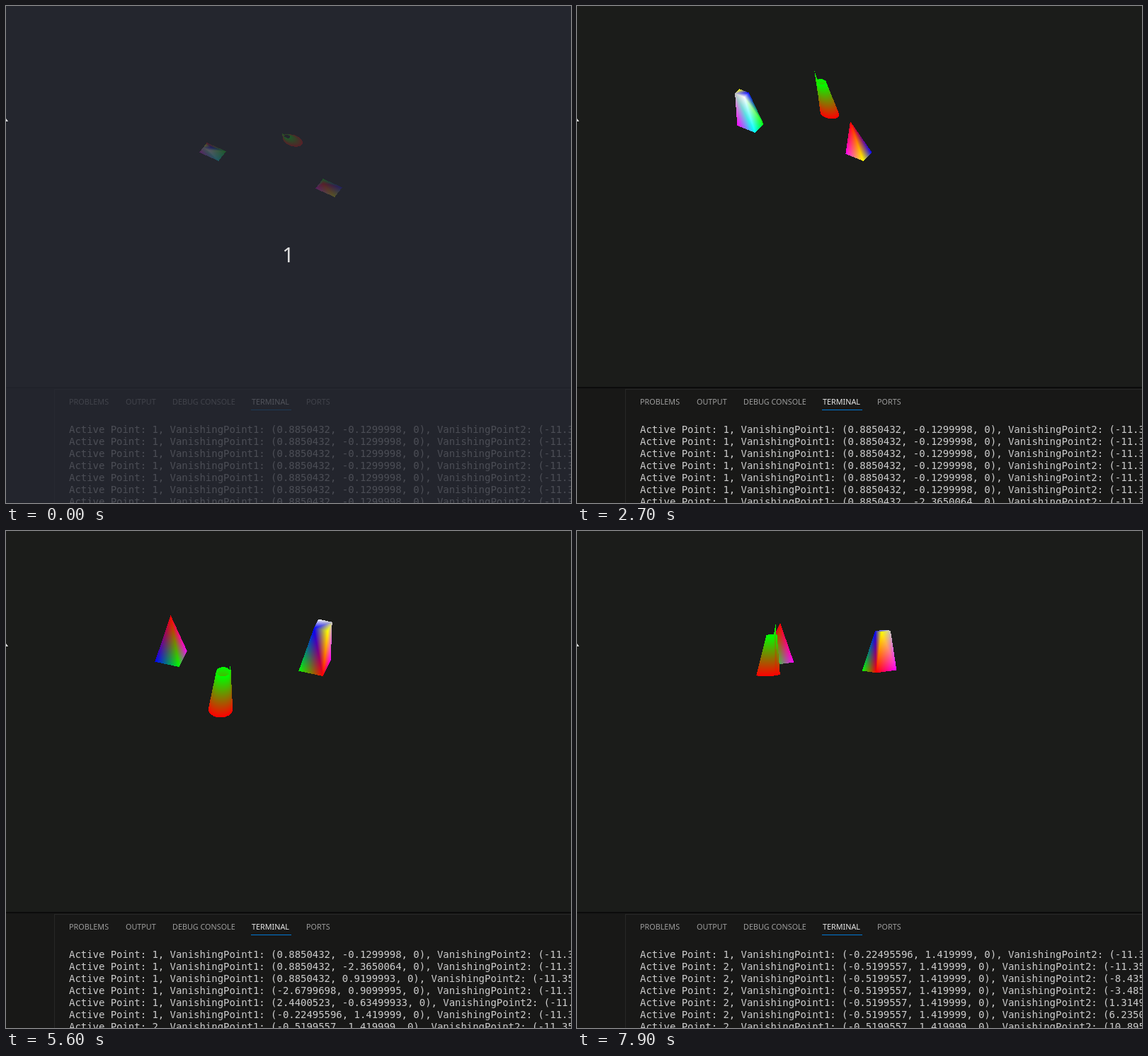
Animation of 798 by 702 pixels, one loop 8000 ms. Source, as an HTML page with a canvas:

```html
<!DOCTYPE html>
<html lang="en">
<head>
<meta charset="utf-8">
<title>Vanishing points</title>
<style>
  html, body { margin: 0; width: 100%; height: 100%; overflow: hidden; background: #1b1c1a; }
  body { position: relative; }
  body > * { position: absolute; }
  #view { left: 0; top: 0; display: block; }
  #panel { left: 0; top: 538px; width: 798px; height: 164px; background: #181817; border-top: 2px solid #0b0b0b; box-sizing: border-box; }
  #edge { left: 68px; top: 541px; width: 730px; height: 161px; border: solid #272727; border-width: 1px 0 0 1px; box-sizing: border-box; }
  .tab { top: 551px; font: 10.8px/16px "Noto Sans", "Open Sans", sans-serif; color: #9d9d9d; white-space: pre; }
  .on { color: #e7e7e7; }
  #mark { left: 346px; top: 570px; width: 57px; height: 1px; background: #0078d4; }
  #log { left: 89px; top: 590px; margin: 0; width: 709px; height: 112px; overflow: hidden; color: #ccc;
    font: 14px/17px "DejaVu Sans Mono", monospace; letter-spacing: -.043px; }
  #shade { left: 0; top: 0; width: 798px; height: 702px; background: rgba(39, 42, 52, .78); }
  #shade span { position: absolute; left: 0; width: 797px; top: 330px; text-align: center; color: #e0e0e0;
    font: 29px/42px "Noto Sans", "Open Sans", sans-serif; }
  #cursor { left: 0; top: 159px; width: 3px; height: 4px; background: #fff; clip-path: polygon(0 0, 100% 100%, 0 100%); }
</style>
</head>
<body>
<canvas id="view" width="798" height="538"></canvas>
<div id="panel"></div>
<div id="edge"></div>
<div class="tab" style="left:89px">PROBLEMS</div>
<div class="tab" style="left:169px">OUTPUT</div>
<div class="tab" style="left:235px">DEBUG CONSOLE</div>
<div class="tab on" style="left:347px">TERMINAL</div>
<div class="tab" style="left:424px">PORTS</div>
<div id="mark"></div>
<pre id="log"></pre>
<div id="shade"><span>1</span></div>
<div id="cursor"></div>
<script>
const W = 798, H = 538, LOOP = 8000, STEP = 100;
const $ = id => document.getElementById(id);
const ctx = $('view').getContext('2d');
const img = ctx.createImageData(W, H);
const px = new Uint32Array(img.data.buffer);
const rgb = (r, g, b) => 0xff000000 | b << 16 | g << 8 | r;
const BG = rgb(27, 28, 26);

const RED = [255, 0, 0], GREEN = [0, 255, 0], BLUE = [0, 0, 255], YELLOW = [255, 255, 0];
const MAGENTA = [255, 0, 255], CYAN = [0, 255, 255], WHITE = [255, 255, 255], GREY = [195, 195, 195];

// Places of tube and pyramid on the floor, counted in cube sides from the cube.
const TUBE = [2.5, 3.3], PYRAMID = [5.1, 1.1], SIZE = .92;

// at: base centres of cube, tube and pyramid; up: height vector; fan: its spread;
// taper: top size to base size; swing: sway on the way to the next pose, in x, y and turns.
const still = { t: 0, at: [[292, 206], [405, 190], [456, 257]], up: [-8, -6], fan: 0, taper: .3 };
const lean = { t: 2600, at: [[245, 168], [357, 152], [398, 208]], up: [-12, -45], fan: 0, taper: .53 };
const poses = [
  still,
  { ...still, t: 400 },
  { t: 900, at: [[294, 246], [392, 228], [434, 298]], up: [-8, -32], fan: .07, taper: 1.15, swing: [-60, -50, 1] },
  lean,
  { ...lean, t: 3300 },
  { t: 4500, at: [[299, 225], [402, 203], [454, 272]], up: [-8, -43], fan: 0, taper: .45 },
  { t: 5600, at: [[436, 190], [303, 252], [233, 177]], up: [5, -56], fan: .06, taper: .57, swing: [0, -44, .5] },
  { t: 6300, at: [[406, 162], [471, 312], [320, 375]], up: [9, 3], fan: .22, taper: .5, swing: [-40, -60, .5] },
  { t: 7900, at: [[427, 197], [270, 203], [282, 186]], up: [5, -56], fan: 0, taper: .45 }
];

const mix = (a, b, f) => Array.isArray(a) ? a.map((v, i) => mix(v, b[i], f)) : a + (b - a) * f;

function poseAt(t) {
  const i = Math.min(poses.length - 1, poses.findLastIndex(p => p.t <= t) + 1);
  const a = poses[i - 1], b = poses[i];
  const f = Math.min(1, (t - a.t) / (b.t - a.t));
  const [sx, sy, turns] = a.swing || [0, 0, 0];
  const sway = Math.sin(2 * Math.PI * turns * f);
  return {
    at: mix(a.at, b.at, f).map(([x, y]) => [x + sx * sway, y + sy * sway]),
    up: mix(a.up, b.up, f), fan: mix(a.fan, b.fan, f), taper: mix(a.taper, b.taper, f)
  };
}

// The three centres fix how the floor's two axes appear on screen.
function floorAxes([o, c, p]) {
  const det = TUBE[0] * PYRAMID[1] - TUBE[1] * PYRAMID[0];
  const axis = (m, n) => [0, 1].map(k => SIZE * (m * (c[k] - o[k]) + n * (p[k] - o[k])) / det);
  return [axis(PYRAMID[1], -TUBE[1]), axis(-PYRAMID[0], TUBE[0])];
}

function ring([x, y], [e, f], n, radius, start) {
  return Array.from({ length: n }, (_, i) => {
    const angle = start + i / n * 2 * Math.PI;
    const a = radius * Math.cos(angle), b = radius * Math.sin(angle);
    return [x + a * e[0] + b * f[0], y + a * e[1] + b * f[1]];
  });
}

const tint = (pts, colors) => pts.map((p, i) => ({ x: p[0], y: p[1], c: colors[i % colors.length] }));
const cross = (a, b, x, y) => (b.x - a.x) * (y - a.y) - (b.y - a.y) * (x - a.x);

function fillTri(a, b, c, area) {
  const xs = [a.x, b.x, c.x], ys = [a.y, b.y, c.y];
  const x0 = Math.max(0, Math.floor(Math.min(...xs))), x1 = Math.min(W - 1, Math.ceil(Math.max(...xs)));
  const y0 = Math.max(0, Math.floor(Math.min(...ys))), y1 = Math.min(H - 1, Math.ceil(Math.max(...ys)));
  for (let y = y0; y <= y1; y++) for (let x = x0; x <= x1; x++) {
    const u = cross(b, c, x + .5, y + .5) / area;
    const v = cross(c, a, x + .5, y + .5) / area;
    const w = 1 - u - v;
    if (Math.min(u, v, w) < -1e-6) continue;
    const shade = k => Math.max(0, Math.min(255, a.c[k] * u + b.c[k] * v + c.c[k] * w));
    px[y * W + x] = rgb(shade(0), shade(1), shade(2));
  }
}

// Back faces first, then front faces.
function drawPrism(top, bottom, capped) {
  const tris = [], n = top.length;
  const quad = (a, b, c, d) => tris.push([a, b, c], [a, c, d]);
  for (let i = 0; i < n; i++) {
    const j = (i + 1) % n;
    quad(top[i], bottom[i], bottom[j], top[j]);
  }
  if (capped) {
    quad(...top);
    quad(...[...bottom].reverse());
  }
  for (const side of [1, -1]) for (const [a, b, c] of tris) {
    const area = cross(a, b, c.x, c.y);
    if (area * side > 1e-3) fillTri(a, b, c, area);
  }
}

function drawScene(t) {
  px.fill(BG);
  const { at, up, fan, taper } = poseAt(t);
  const axes = floorAxes(at);
  const mid = [0, 1].map(k => (at[0][k] + at[1][k] + at[2][k]) / 3);
  const rise = p => p.map((v, k) => v + up[k] + fan * (v - mid[k]));
  const square = (p, scale) => ring(p, axes, 4, Math.SQRT1_2 * scale, -.75 * Math.PI);
  const circle = (p, scale) => ring(p, axes, 24, .48 * scale, 0);
  const [box, tube, cone] = at;

  drawPrism(tint(square(rise(box), taper), [GREY, WHITE, BLUE, YELLOW]),
    tint(square(box, 1), [MAGENTA, CYAN, GREEN, RED]), true);

  drawPrism(tint(square(rise(cone), 0), [RED]),
    tint(square(cone, 1), [MAGENTA, YELLOW, BLUE, GREEN]), true);

  // One rim point is drawn out to a spike as the top narrows.
  const rim = circle(rise(tube), taper), top = rise(tube);
  const pull = .6 * Math.max(0, 1 - taper);
  rim[12] = rim[12].map((v, k) => v + pull * (top[k] - tube[k]));
  drawPrism(tint(rim, [GREEN]), tint(circle(tube, 1), [RED]), false);
  ctx.putImageData(img, 0, 0);
}

const logRow = (n, a, b) => `Active Point: ${n}, VanishingPoint1: (${a}, 0), VanishingPoint2: (${b}, 0, 0)`;
const rows = [
  ...['0.8850432, -0.1299998', '0.8850432, -2.3650064', '0.8850432, 0.9199993', '-2.6799698, 0.9099995',
    '2.4400523, -0.63499933', '-0.22495596, 1.419999'].map(a => logRow(1, a, '-11.35')),
  ...['-11.35', '-8.435', '-3.485', '1.3149', '6.2350', '10.895'].map(b => logRow(2, '-0.5199557, 1.419999', b))
];

function logAt(t) {
  const last = 2 + Math.floor((t - 3200) / 515);
  return Array.from({ length: 7 }, (_, i) => rows[Math.max(0, last - 6 + i)]).join('\n');
}

let shown = -1;
function tick() {
  const t = Math.floor(performance.now() % LOOP / STEP) * STEP;
  if (t !== shown) {
    shown = t;
    drawScene(t);
    $('log').textContent = logAt(t);
    $('shade').style.display = t < STEP ? 'block' : 'none';
  }
  requestAnimationFrame(tick);
}
tick();
</script>
</body>
</html>
```
